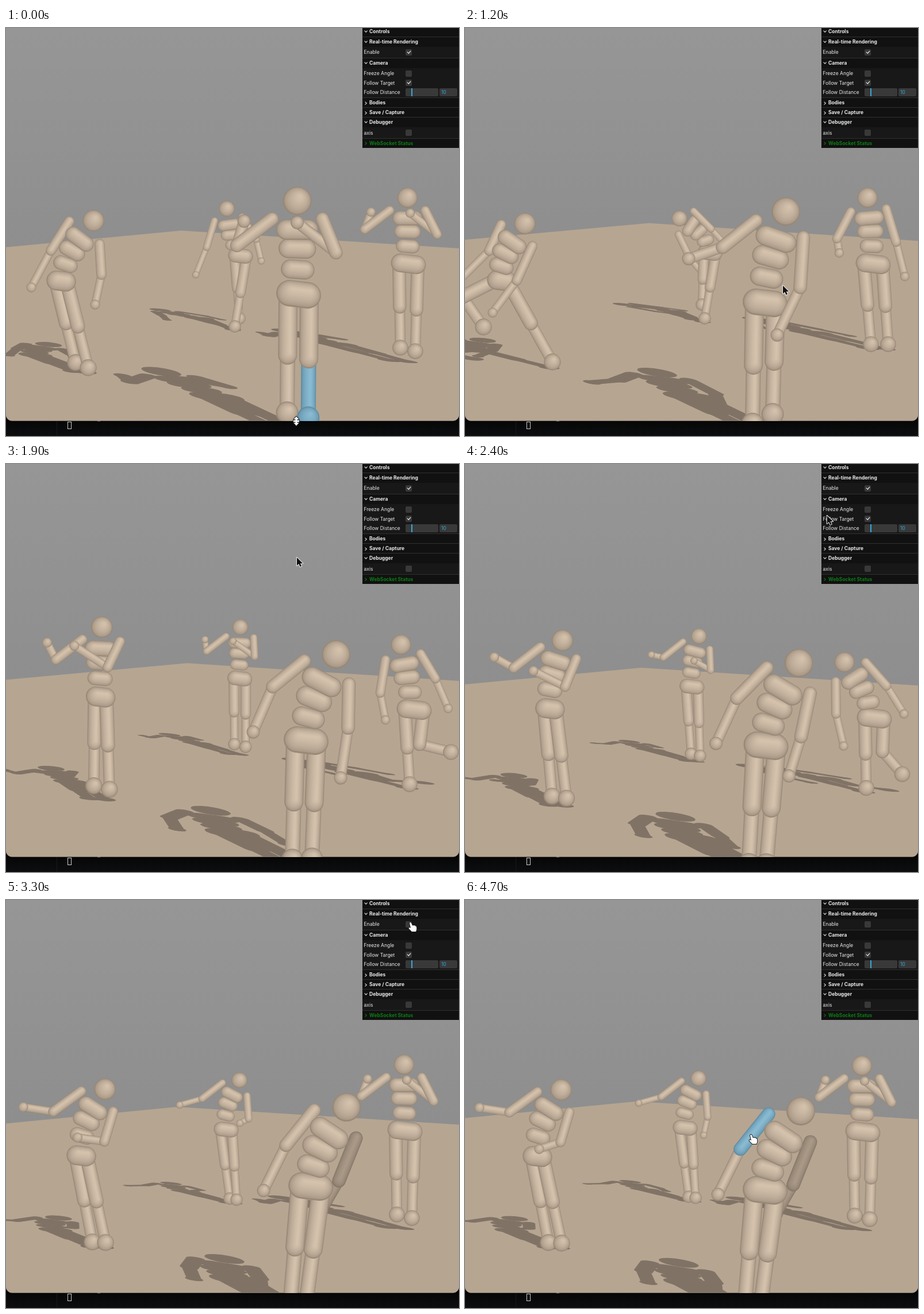
An HTML page with a canvas that plays this animation: 788 by 711 pixels, repeating every 4.8 s.

```html
<!DOCTYPE html>
<html lang="en">
<head>
<meta charset="utf-8">
<title>Humanoid viewer</title>
<style>
html, body { margin: 0; width: 788px; height: 711px; overflow: hidden; background: #08090a; }
canvas { position: absolute; left: 0; top: 0; }
#panel { position: absolute; left: 620px; top: 0; width: 168px; height: 209px; background: #181818;
  color: #ebebeb; font: 8.5px/12px Inter, "Liberation Sans", sans-serif; overflow: hidden; }
#panel div { position: absolute; white-space: nowrap; }
.title { left: 0; width: 156px; height: 17px; padding-left: 12px; line-height: 17px; font-weight: 700;
  background: #111; border-top: 1px solid #303030; }
.title::before { content: ""; position: absolute; left: 3.5px; top: 5px; width: 3.2px; height: 3.2px;
  border: solid #ebebeb; border-width: 0 1.3px 1.3px 0; transform: rotate(45deg); }
.title.shut::before { left: 2.5px; top: 6.5px; transform: rotate(-45deg); }
.title.status { color: #0b7d12; }
.title.status::before { border-color: #0b7d12; }
.label { left: 2.5px; }
.box { left: 75px; width: 11px; height: 11px; border-radius: 2px; background: #393939; }
.box.on::after { content: ""; position: absolute; left: 3.6px; top: 1.2px; width: 2.6px; height: 5px;
  border: solid #fff; border-width: 0 1.6px 1.6px 0; transform: rotate(42deg); }
.slider { left: 75px; top: 105px; width: 57px; height: 14px; border-radius: 2px; background: #393939; }
.slider::before { content: ""; position: absolute; left: 9.5px; width: 2px; height: 14px; background: #36a9d8; }
.num { left: 134px; top: 105px; width: 28px; height: 14px; padding-left: 3px; border-radius: 2px;
  background: #393939; color: #36a9d8; line-height: 14px; }
</style>
</head>
<body>
<canvas id="scene" width="788" height="711"></canvas>
<div id="panel"></div>
<canvas id="pointer" width="788" height="711"></canvas>
<script>
const W = 788, H = 711, LOOP = 4800, STEP = 100;
const g = document.getElementById('scene').getContext('2d');
const p = document.getElementById('pointer').getContext('2d');
const panel = document.getElementById('panel');

// ---- control panel ----
function put(cls, top, text = '') {
  const el = document.createElement('div');
  el.className = cls;
  el.style.top = top + 'px';
  el.textContent = text;
  panel.append(el);
  return el;
}
const title = (y, text, cls = '') => put('title ' + cls, y - 9, text);
function toggle(y, text, on) {
  put('label', y - 6, text);
  return put(on ? 'box on' : 'box', y - 5.5);
}
title(6, 'Controls');
title(24, 'Real-time Rendering');
const enable = toggle(42, 'Enable', true);
title(60.5, 'Camera');
toggle(79, 'Freeze Angle', false);
toggle(95.5, 'Follow Target', true);
put('label', 106, 'Follow Distance');
put('slider', 105);
put('num', 105, '10');
title(130, 'Bodies', 'shut');
title(147, 'Save / Capture', 'shut');
title(164, 'Debugger');
toggle(182.5, 'axis', false);
title(200.5, 'WebSocket Status', 'shut status');

// ---- small maths ----
const mix = (a, b, k) => a + (b - a) * k;
const mixAll = (a, b, k) => a.map((v, i) => mix(v, b[i], k));
const along = (pt, dir, len) => [pt[0] + dir[0] * len, pt[1] + dir[1] * len];
const bend = (a, b, c, k) => mixAll(mixAll(a, b, k), mixAll(b, c, k), k);

// Keys around time t and how far it is between them.
function span(keys, t) {
  const n = keys.findIndex(k => k.t > t);
  const a = keys[n < 0 ? keys.length - 1 : n - 1], b = n < 0 ? a : keys[n];
  return [a, b, a === b ? 0 : (t - a.t) / (b.t - a.t)];
}
function blend(keys, t) {
  const [a, b, k] = span(keys, t);
  return b.fresh ? a.v : mixAll(a.v, b.v, k);
}
const key = (t, ...v) => ({ t, v });

// ---- figures ----
// r: head radius, hip: half pelvis, lean and rise: where the shadow of a height falls
const figure = (r, hip, lean, rise) => ({ r, hip, lean, rise, keys: [] });
const front = figure(25, .64, .58, .27);
const left = figure(18.8, .45, .29, .19);
const back = figure(13.8, .65, .55, .165);
const right = figure(17.7, .8, .73, .195);

// Points: pelvis, chest, head, left elbow and hand, right elbow and hand, feet
function pose(fig, t, behind, ...v) {
  fig.keys.push({ ...key(t, 0, ...v), behind });
}
// Respawn with both arms raised, just above the ground.
function ready(fig, t, x, y, turn) {
  const v = [
    0, 0, -.1, -4.5, -.1, -6.5, -4.3, -3.4, -4.6 + .8 * turn, -5.1,
    1.1 + 1.5 * turn, -2.9, -1.9 + 1.8 * turn, -5, -.8, 8.25, .67, 8.6
  ].map((n, i) => n * fig.r + (i % 2 ? y : x));
  fig.keys.push({ ...key(t, .7 * fig.r, ...v), fresh: true });
}
// Same pose moved by the camera, the right hand may drop as well.
function again(fig, t, dx, dy, hx = 0, hy = 0) {
  const last = fig.keys.at(-1);
  const v = last.v.map((n, i) => i ? n + (i % 2 ? dx : dy) : n);
  v[13] += hx;
  v[14] += hy;
  fig.keys.push({ ...key(t, ...v), behind: last.behind });
}

ready(front, 0, 509, 464, 1);
pose(front, 600, false, 515,491, 519,381, 536,333, 414,389, 399,350, 572,457, 511,458, 494,690, 541,674);
pose(front, 1200, false, 522,479, 541,368, 558,320, 448,382, 389,402, 583,452, 543,535, 500,690, 535,673);
pose(front, 1900, false, 522,482, 549,380, 574,332, 464,388, 430,467, 595,460, 582,547, 498,690, 532,688);
pose(front, 2900, true, 525,500, 557,407, 587,362, 482,428, 443,507, 574,490, 545,540, 489,705, 516,708);
again(front, 4000, 14, -2);
again(front, 4700, -17, 8);

pose(left, 0, false, 96,441, 128,368, 152,336, 78,388, 44,452, 166,430, 155,482, 121,583, 143,592);
pose(left, 600, true, 81,444, 116,375, 151,352, 70,387, 15,439, 141,450, 113,492, 58,574, 146,592);
pose(left, 1200, false, 64,440, 82,373, 104,341, 42,388, -18,448, 90,440, 48,496, 32,521, 152,582);
ready(left, 1800, 168, 402, -.4);
pose(left, 2900, false, 131,447, 151,364, 172,331, 82,370, 30,362, 171,422, 119,404, 150,597, 173,598);
again(left, 4000, 0, -3, 15, 30);
again(left, 4700, -5, 3);

pose(back, 0, false, 408,397, 388,343, 384,315, 349,382, 330,430, 435,368, 444,406, 406,506, 398,520);
pose(back, 600, false, 414,392, 392,341, 377,320, 370,397, 382,445, 434,355, 455,385, 406,505, 408,517);
pose(back, 1200, false, 426,392, 393,345, 373,332, 392,403, 427,444, 428,350, 455,380, 412,482, 417,506);
ready(back, 1800, 409, 371, .45);
pose(back, 2900, false, 383,402, 393,341, 406,316, 341,348, 302,359, 422,383, 402,377, 389,522, 401,524);
again(back, 4000, 0, -5, 13, 38);

ready(right, 0, 700, 411, 1.15);
pose(right, 600, false, 706,417, 700,342, 697,305, 630,356, 627,361, 744,380, 737,396, 692,560, 704,571);
pose(right, 1200, false, 710,411, 703,331, 700,296, 647,367, 651,392, 750,373, 765,433, 706,551, 736,551);
pose(right, 1900, false, 710,428, 693,349, 687,315, 651,399, 660,446, 747,374, 769,426, 702,558, 774,502);
pose(right, 2900, false, 714,458, 663,398, 633,376, 640,472, 657,537, 719,399, 758,445, 694,571, 747,579);
ready(right, 3000, 694, 402, 1.15);
again(right, 4000, 0, 0);
again(right, 4700, -2, 2);

// Where the knee sits; short reaches push it out.
function knee(hip, foot, r) {
  const dx = foot[0] - hip[0], dy = foot[1] - hip[1], d = Math.hypot(dx, dy) || 1;
  const out = Math.max(0, r * 3.3 - d / 2) * 2.5;
  return along(mixAll(hip, foot, .52), [-dy / d, dx / d], out);
}

function skeleton(fig, t) {
  const { r } = fig, v = blend(fig.keys, t), pts = [];
  for (let i = 1; i < v.length; i += 2) pts.push([v[i], v[i + 1]]);
  const [pelvis, chest, head, e1, h1, e2, h2, f1, f2] = pts;
  const dx = head[0] - chest[0], dy = head[1] - chest[1], d = Math.hypot(dx, dy);
  const up = [dx / d, dy / d], side = [-up[1], up[0]], level = [1, .12];
  const bow = along(chest, up, -2.4 * r);
  const neck = along(chest, up, .75 * r);

  // a torso slice at height k between pelvis and chest
  const slice = (k, half) => {
    const c = bend(pelvis, bow, chest, k), axis = mixAll(level, side, k);
    return [along(c, axis, -half * r), along(c, axis, half * r)];
  };
  const hips = slice(0, fig.hip);
  const leg = (s, foot) => {
    const hip = along(pelvis, level, s * fig.hip * r * 1.15);
    return [hip, knee(hip, foot, r), foot];
  };
  return {
    r, head, hips, lift: v[0], behind: span(fig.keys, t)[0].behind,
    torso: [slice(.4, .5), slice(.72, .62), slice(1, .76)],
    armL: [along(neck, side, -1.75 * r), e1, h1],
    armR: [along(neck, side, 1.75 * r), e2, h2],
    legL: leg(-1, f1), legR: leg(1, f2)
  };
}

// ---- drawing bodies ----
const LAYERS = 11;
const ramp = (lo, hi) => Array.from({ length: LAYERS }, (_, i) => {
  const k = Math.pow(i / (LAYERS - 1), .5);
  return `rgb(${mixAll(lo, hi, k).map(Math.round)})`;
});
const SKIN = ramp([153, 137, 119], [212, 194, 173]);
const DIM = ramp([132, 118, 103], [170, 153, 135]);
const BLUE = ramp([92, 138, 161], [137, 187, 211]);
const SHADOW = ['rgb(128,115,102)'];

// A round-ended bar; each layer is thinner, lighter and nearer the light.
function bar(a, b, r, tone) {
  g.lineCap = 'round';
  tone.forEach((color, i) => {
    const k = i / LAYERS, ox = r * .25 * k, oy = -r * .35 * k;
    g.strokeStyle = color;
    g.lineWidth = 2 * r * (1 - k);
    g.beginPath();
    g.moveTo(a[0] + ox, a[1] + oy);
    g.lineTo(b[0] + ox + .01, b[1] + oy);
    g.stroke();
  });
}

function body(s, tone, hot) {
  const r = tone === SHADOW ? s.r * 1.25 : s.r;
  const pick = name => hot === name ? BLUE : tone;
  function arm([shoulder, elbow, hand], color, upper) {
    bar(elbow, hand, r * .38, color);
    bar(hand, hand, r * .46, color);
    bar(shoulder, elbow, r * .47, upper);
  }
  function leg([hip, mid, foot], color) {
    bar(mid, foot, r * .52, color);
    bar(foot, foot, r * .78, color);
    bar(hip, mid, r * .66, tone);
  }
  arm(s.armL, tone, pick('arm'));
  const far = tone === SKIN ? DIM : tone;
  if (s.behind) arm(s.armR, far, far);
  leg(s.legL, tone);
  leg(s.legR, pick('shin'));
  bar(...s.hips, r * .92, tone);
  s.torso.forEach(([a, b], i) => bar(a, b, r * (.67 + .02 * i), tone));
  bar(s.head, s.head, r, tone);
  if (!s.behind) arm(s.armR, tone, tone);
}

function shadow(fig, s) {
  const [a, b] = [s.legL[2], s.legR[2]];
  const x = (a[0] + b[0]) / 2, y = Math.max(a[1], b[1]) + s.r * .5 + s.lift;
  g.save();
  g.translate(x, y);
  g.transform(.95, .03, fig.lean, fig.rise, 0, 0);
  g.translate(-x, -y);
  body(s, SHADOW);
  g.restore();
}

// ---- scene ----
// far corner of the floor
const CORNER = [
  key(0, 305, 353), key(600, 312, 350), key(1200, 320, 340), key(1900, 315, 347),
  key(2900, 298, 363), key(4000, 296, 356), key(4700, 298, 351)
];

function fill(style, path) {
  g.fillStyle = style;
  g.beginPath();
  path();
  g.fill();
}
function fade(y0, y1, from, to) {
  const grad = g.createLinearGradient(0, y0, 0, y1);
  grad.addColorStop(0, from);
  grad.addColorStop(1, to);
  return grad;
}

function terminal() {
  fill(fade(676, H, '#040405', '#0d0e0f'), () => g.rect(0, 0, W, H));
  fill('#17181a', () => g.rect(88, 684, 1, 27));
  fill('#777', () => g.rect(159, 684, 5, 1.5));
  g.strokeStyle = '#d0d0d0';
  g.lineWidth = 1;
  g.strokeRect(107.5, 686.5, 6, 12);
}

function scene(t) {
  const [cx, cy] = blend(CORNER, t);
  terminal();
  g.save();
  g.beginPath();
  g.roundRect(0, -20, W, 704.5, 10);
  g.clip();
  fill(fade(0, 390, '#969696', '#8e8e8e'), () => g.rect(0, 0, W, H));
  fill('#b6a591', () => {
    g.moveTo(0, cy + 29);
    g.lineTo(cx, cy);
    g.lineTo(W, cy + 31);
    g.lineTo(W, H);
    g.lineTo(0, H);
  });
  const hot = t < 300 ? 'shin' : t >= 4000 ? 'arm' : '';
  const cast = [back, right, left, front].map(fig => [fig, skeleton(fig, t)]);
  cast.forEach(([fig, s]) => shadow(fig, s));
  cast.forEach(([fig, s]) => body(s, SKIN, fig === front ? hot : ''));
  g.restore();
}

// ---- pointer ----
const TRACK = [
  key(0, 505, 685), key(700, 505, 685), key(1200, 553, 449), key(1900, 506, 163),
  key(2700, 704, 46), key(2900, 707, 47), key(3600, 707, 47), key(4000, 503, 417), key(4700, 501, 417)
];
const SHAPES = {
  resize: [new Path2D('M0-8L4.5-3H1.5V-1.5H5V1.5H1.5V3H4.5L0 8L-4.5 3H-1.5V1.5H-5V-1.5H-1.5V-3H-4.5Z'), '#fff', '#222'],
  arrow: [new Path2D('M0 0V14L3.3 11L5.6 16L8 15L5.8 10.2H10.3Z'), '#111', '#eee'],
  hand: [new Path2D('M-5-7Q-3.5-9-2-7L0-2Q1-4 2.5-2.2Q4-3.5 5-1.5Q6.5-2 7 0Q8 4 6 8H-1Q-4 5-6 3Q-7 1-5 1L-3 2Z'), '#fff', '#222']
};
function pointer(t) {
  const kind = t < 800 ? 'resize' : t < 2700 || (t > 3600 && t < 4000) ? 'arrow' : 'hand';
  const [path, inner, edge] = SHAPES[kind];
  p.clearRect(0, 0, W, H);
  p.save();
  p.translate(...blend(TRACK, t));
  p.lineJoin = 'round';
  p.lineWidth = 2;
  p.strokeStyle = edge;
  p.stroke(path);
  p.fillStyle = inner;
  p.fill(path);
  p.restore();
}

let last = -1;
function tick() {
  const t = Math.floor(performance.now() % LOOP / STEP) * STEP;
  if (t !== last) {
    last = t;
    scene(t);
    pointer(t);
    enable.classList.toggle('on', t < 3100);
  }
  requestAnimationFrame(tick);
}
tick();
</script>
</body>
</html>
```
